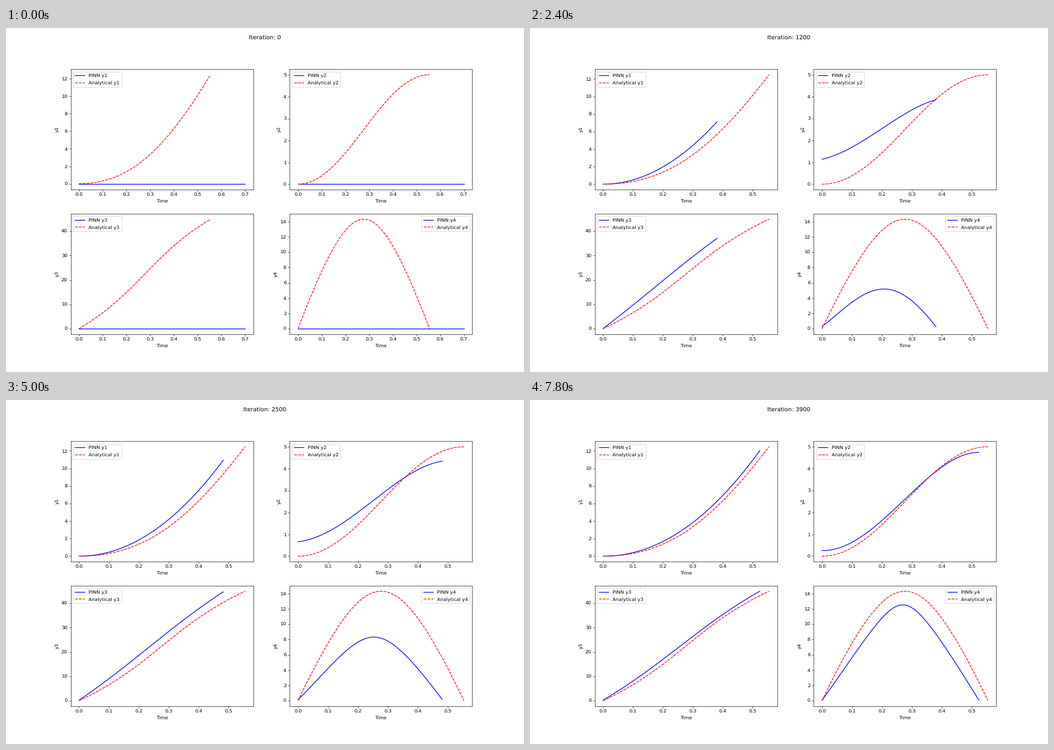
A matplotlib script for the animation above (8 s loop, 917 by 611 pixels).

```python
import numpy as np
import matplotlib.pyplot as plt
from matplotlib.animation import FuncAnimation

plt.rcParams["font.family"] = "DejaVu Sans"
plt.rcParams["text.hinting"] = "no_hinting"

DPI = 917 / 15
FRAMES, INTERVAL = 40, 200
BLUE, RED = "blue", "red"

# Minimum-time linear tangent steering: tan(angle) = P - Q * t
ACCEL, T_END, P = 100, 0.5545709, 1.409
Q = 2 * P / T_END


def bump(u, p):
    """Arch from 0 over 1 back to 0; larger p gives straighter flanks."""
    top = np.hypot(1, p)
    return (top - np.hypot(1, p * (1 - 2 * u))) / (top - 1)


def climb(u, p):
    """S-shaped rise from 0 to 1, steepest in the middle."""
    return 0.5 - np.arcsinh(p * (1 - 2 * u)) / np.arcsinh(p) / 2


def integrate(y, t):
    steps = (y[1:] + y[:-1]) / 2 * np.diff(t)
    return np.concatenate([[0], np.cumsum(steps)])


def steering():
    t = np.linspace(0, T_END, 401)
    y3 = 2 * ACCEL / Q * np.arcsinh(P) * climb(t / T_END, P)
    y4 = ACCEL / Q * (np.hypot(1, P) - 1) * bump(t / T_END, P)
    return t, [integrate(y3, t), integrate(y4, t), y3, y4]


def stage(k, *vals):
    return np.interp(k, [4, 12, 17, 39], vals)


def network(k):
    """Time span and the four network curves at step k."""
    span = np.interp(k, [0, 4, 5, 12, 17, 25, 39],
                     [.7, .285, .28, .381, .441, .482, .524])
    u = np.linspace(0, 1, 200)
    x = k - 4
    tail = np.exp(-x / 2.2)                       # early error dying out
    grown = 1 - (1 - min(k / 4, 1)) ** 2          # from the flat first guess

    start3 = 0.15 - 4.15 * tail
    end3 = 45 - 25.7 * np.exp(-0.104 * x - 0.0055 * x * x)
    y3 = start3 + (end3 - start3) * climb(u ** stage(k, .88, .985, .985, .985),
                                          stage(k, 1.6, .5, .58, .9))

    end1 = (start3 + end3) * span * (0.5 + 0.00023 * k)
    y1 = end1 * u ** (1.974 + 0.0022 * k) + start3 * span * u * (1 - u)

    gap = stage(k, 1.14, 1.14, .89, .255)         # same miss at both ends
    v = u ** stage(k, .9, 1.04, 1.04, 1.04)
    bend = stage(k, .47, .5, .59, 1)
    y2 = gap + (5 - 2 * gap) * (v + bend * (v * v * (3 - 2 * v) - v))

    rest = 0.3 * (1 - k / 55)
    y4 = (rest + 3.75 * tail * (1 - 0.74 * u)
          + stage(k, 6.6, 4.9, 5.7, 12.45)
          * bump(u ** stage(k, 1, 1.14, 1.1, 1.045),
                 stage(k, 1.7, 1, 1.4, 3.4)))

    curves = [grown * y for y in (y1, y2, y3, y4)]
    curves[0] -= 0.06 * (1 - grown)
    return span * u, curves


fig, grid = plt.subplots(2, 2, figsize=(917 / DPI + 1e-9, 611 / DPI + 1e-9),
                         dpi=DPI)
title = fig.suptitle("Iteration: 0")
axes = grid.ravel()
lines = []
t_exact, exact = steering()
for n, (ax, y) in enumerate(zip(axes, exact), 1):
    lines += ax.plot([], [], color=BLUE, label=f"PINN y{n}")
    ax.plot(t_exact, y, "--", color=RED, label=f"Analytical y{n}")
    ax.set_xlabel("Time")
    ax.set_ylabel(f"y{n}")
    ax.legend(loc="upper right" if n == 4 else "upper left",
              labelspacing=0.54, borderpad=0.42)


def draw(k):
    title.set_text(f"Iteration: {k * 100}")
    t, curves = network(k)
    for ax, line, y in zip(axes, lines, curves):
        line.set_data(t, y)
        ax.relim()
        ax.autoscale_view()
    return [title, *lines]


anim = FuncAnimation(fig, draw, frames=FRAMES, interval=INTERVAL,
                     repeat=True, repeat_delay=0, blit=False)
plt.show()
```
